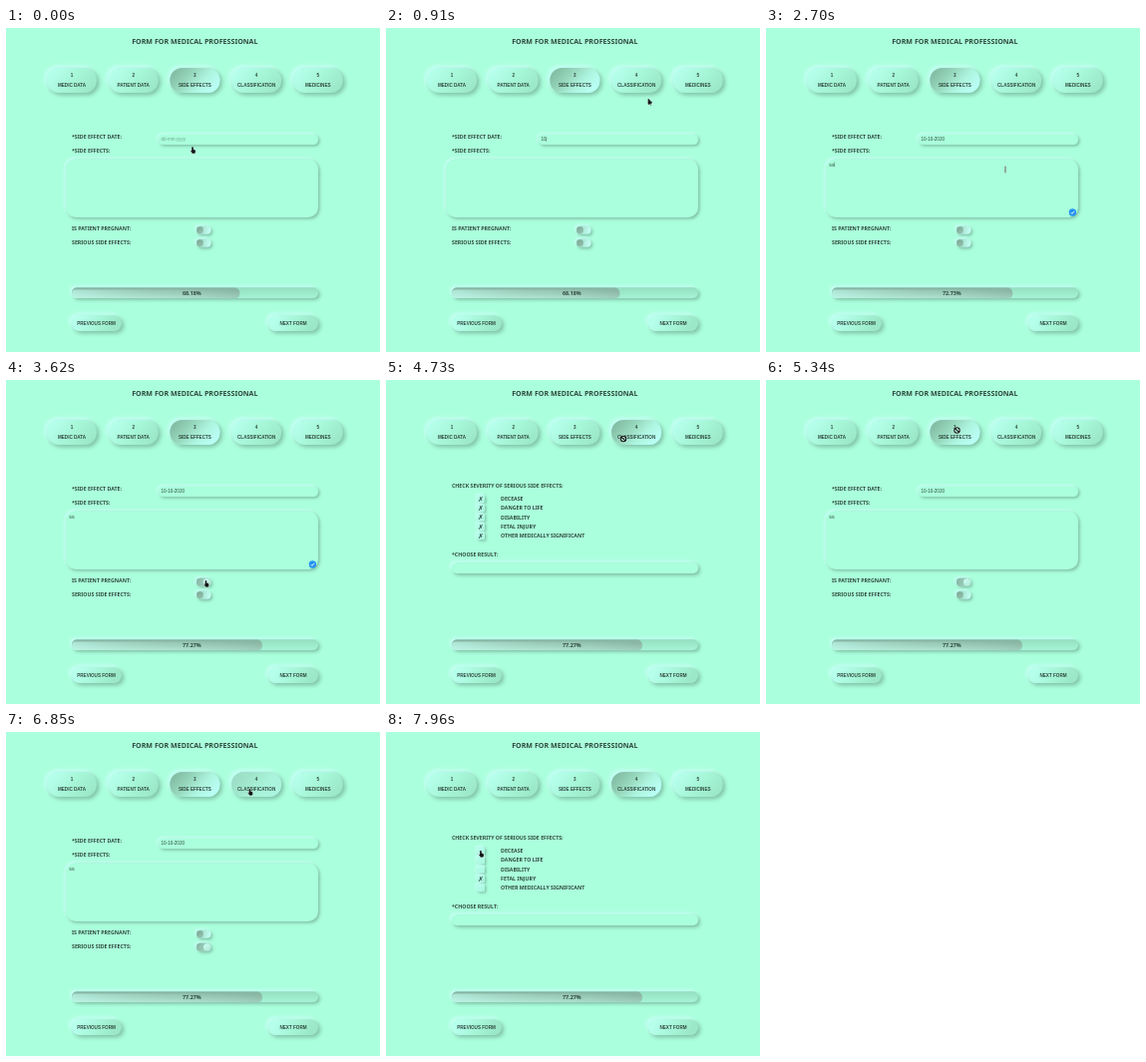
An HTML page with a canvas that plays this animation: 375x325 px, repeating every 8000 ms.

```html
<!DOCTYPE html>
<html lang="en">
<head>
<meta charset="utf-8">
<title>Medical form</title>
<style>
html, body { margin: 0; width: 100%; height: 100%; overflow: hidden; background: #aaffdc; }
canvas { display: block; width: 375px; height: 325px; }
</style>
</head>
<body>
<canvas id="stage"></canvas>
<script>
const LOOP = 8000, BASE = '#aaffdc', INK = '#30493f', BLACK = '#121816';
const LIGHT = '#c8fff8', DARK = '#7fc0a6';
const UI = '"Noto Sans", "Open Sans", sans-serif';
const SANS = '"Liberation Sans", Arial, sans-serif';
const TABS = ['MEDIC DATA', 'PATIENT DATA', 'SIDE EFFECTS', 'CLASSIFICATION', 'MEDICINES'];
const EFFECTS = ['DECEASE', 'DANGER TO LIFE', 'DISABILITY', 'FETAL INJURY', 'OTHER MEDICALLY SIGNIFICANT'];

// moments at which the user acts
const OPEN_CLASS = 4550, BACK = 5200, REOPEN = 6910;
const DATE_DONE = 1910, NOTE_FOCUS = 2400, SERIOUS_ON = 5800, PICK = 7700;

// arrival time and place of each pointer stop
const TRAVEL = 300;
const STOPS = [
  { at: 0, x: 187, y: 120.5 },
  { at: 250, x: 188, y: 111 },
  { at: 610, x: 263, y: 71.5 },
  { at: 2270, x: 240, y: 142 },
  { at: 3200, x: 200.5, y: 201.5 },
  { at: 4450, x: 238, y: 59 },
  { at: 5080, x: 191.5, y: 50.5 },
  { at: 5640, x: 200, y: 215 },
  { at: 6790, x: 244.5, y: 57.5 },
  { at: 7560, x: 108, y: 178 },
  { at: 7680, x: 96, y: 146 },
  { at: 7920, x: 95, y: 119.5 }
];

const canvas = document.getElementById('stage');
const ctx = canvas.getContext('2d');
const scale = window.devicePixelRatio || 1;
canvas.width = 375 * scale;
canvas.height = 325 * scale;

const clamp = (v, max = 1) => Math.max(0, Math.min(max, v));
const mix = (a, b, k) => a + (b - a) * k;
const ramp = (t, start, length = 120) => {
  const v = clamp((t - start) / length);
  return v * v * (3 - 2 * v);
};
const pageAt = t => t >= REOPEN || (t >= OPEN_CLASS && t < BACK) ? 4 : 3;
const tabX = i => 66 + i * 61.7;
const rowY = i => 119.2 + i * 9.3;

function pointerAt(t) {
  let { x, y } = STOPS[0];
  for (const stop of STOPS.slice(1)) {
    const k = ramp(t, stop.at - TRAVEL, TRAVEL);
    x = mix(x, stop.x, k);
    y = mix(y, stop.y, k);
  }
  return { x, y };
}

// the pointer's look follows from what lies under it
function pointerKind({ x, y }, page) {
  const within = (left, top, w, h) => x >= left && x <= left + w && y >= top && y <= top + h;
  const tab = TABS.findIndex((_, i) => within(tabX(i) - 25, 40, 50, 25));
  if (tab >= 0) return tab === page - 1 ? 'blocked' : 'hand';
  if (page === 4) return within(91, 115, 9, 46) ? 'hand' : 'arrow';
  if (within(153, 107, 160, 10) || within(60, 131, 253, 59)) return 'beam';
  return within(153, 118, 160, 10) || within(191, 199, 15, 22) ? 'hand' : 'arrow';
}

function text(str, x, y, font, align = 'left', color = INK) {
  ctx.font = font;
  ctx.textAlign = align;
  ctx.fillStyle = color;
  ctx.fillText(str, x, y);
}
const label = (str, x, y) => text(str, x, y + 1.7, `600 5.25px ${UI}`);
const small = (str, x, y) => text(str, x, y + 1.7, `bold 4.6px ${SANS}`, 'center');

function gradient(x0, y0, x1, y1, ...colors) {
  const g = ctx.createLinearGradient(x0, y0, x1, y1);
  colors.forEach((c, i) => g.addColorStop(i / (colors.length - 1), c));
  return g;
}

// light falls from the top left, so shading runs to the bottom right
function shade(x, y, w, h, ...colors) {
  const cx = x + w / 2, cy = y + h / 2;
  return gradient(cx - w * .3, cy - h * .55, cx + w * .3, cy + h * .55, ...colors);
}

function fillBox(x, y, w, h, r, fill) {
  ctx.beginPath();
  ctx.roundRect(x, y, w, h, r);
  ctx.fillStyle = fill;
  ctx.fill();
}

function raised(x, y, w, h, r, fill = BASE, depth = 1.8) {
  ctx.save();
  for (const side of [-1, 1]) {
    ctx.shadowColor = side < 0 ? LIGHT : DARK;
    ctx.shadowOffsetX = ctx.shadowOffsetY = side * depth * scale;
    ctx.shadowBlur = depth * 2 * scale;
    fillBox(x, y, w, h, r, fill);
  }
  ctx.restore();
}

function button(x, y, w, h, r, pressed = 0) {
  raised(x, y, w, h, r, shade(x, y, w, h, '#b5ffeb', '#a6f6d8', '#9be8c9'), 2.2);
  ctx.save();
  ctx.globalAlpha = pressed;
  fillBox(x, y, w, h, r, shade(x, y, w, h, '#84bea5', '#97d8bd', '#aef5e0', '#b9fff5'));
  ctx.restore();
}

function toggle(y, on) {
  const x = 191;
  raised(x, y, 14.5, 8, 4, gradient(x, y, x + 14, y + 4, '#93cdb7', '#c3fff3'), 1.6);
  ctx.save();
  ctx.globalAlpha = on;
  fillBox(x, y, 14.5, 8, 4, gradient(x, y, x + 14, y + 4, '#86b5a3', '#a5dcc7'));
  ctx.globalAlpha = 1 - on;
  fillBox(x + .3, y + .5, 6.5, 7, 3.3, shade(x, y, 7, 7, '#7da695', '#92c2ae'));
  ctx.globalAlpha = on;
  fillBox(x + 1 + on * 6, y + .5, 7, 7, 3.5, shade(x + 7, y, 7, 7, '#ccfff5', '#b2ebd9'));
  ctx.restore();
}

function header(t) {
  text('FORM FOR MEDICAL PROFESSIONAL', 189.3, 15.5, `bold 7.1px ${UI}`, 'center');
  const sideUp = ramp(t, OPEN_CLASS) - ramp(t, BACK - 50) + ramp(t, REOPEN);
  const classDown = ramp(t, OPEN_CLASS - 50) - ramp(t, BACK) + ramp(t, REOPEN - 120);
  TABS.forEach((name, i) => {
    const pressed = i === 2 ? 1 - sideUp : i === 3 ? classDown : 0;
    button(tabX(i) - 25, 40, 50, 25, 12, pressed);
    small(i + 1, tabX(i), 47);
    small(name, tabX(i), 57);
  });
}

function footer(t) {
  const filled = 15 + ramp(t, DATE_DONE - 260, 250) + ramp(t, NOTE_FOCUS + 240, 250);
  const x = 66, y = 260.5, w = 247 * filled / 22, h = 10.5;
  raised(x, y, 247, h, 5, gradient(x, y, x, y + h, '#95dfc1', '#a5f3d6'));
  fillBox(x, y, w, h, 5, gradient(x, y, x, y + h, '#83b09f', '#9bcbb8', '#b4e6d6'));
  fillBox(x, y + 2, w, h - 2, 4, gradient(x, 0, x + w, 0, '#c2fff199', '#a9e0cc44', '#7fa69766'));
  text((Math.round(filled) / 22 * 100).toFixed(2) + '%', 186.3, 267.6, `bold 5.4px ${UI}`, 'center');
  ['PREVIOUS FORM', 'NEXT FORM'].forEach((name, i) => {
    button(66 + i * 197, 288.5, 50, 15.5, 7.5);
    small(name, 90.5 + i * 197.5, 296);
  });
}

function typed(str, x, y, font, focused) {
  text(str, x, y, font);
  if (focused) ctx.fillRect(x + ctx.measureText(str).width, y - 4, .4, 4.8);
}

function badge(x, y) {
  fillBox(x - 3.7, y - 3.7, 7.4, 7.4, 3.7, '#2394ef');
  ctx.beginPath();
  ctx.moveTo(x - 1.7, y + .1);
  ctx.lineTo(x - .5, y + 1.3);
  ctx.lineTo(x + 1.8, y - 1.2);
  ctx.lineWidth = .9;
  ctx.strokeStyle = '#fff';
  ctx.stroke();
}

function sidePage(t) {
  label('*SIDE EFFECT DATE:', 66, 109.5);
  label('*SIDE EFFECTS:', 66, 123.5);
  raised(153, 107, 160, 10, 4.5, BASE, 1.5);
  const digits = clamp(Math.floor(10 + (t - DATE_DONE) / 135), 10);
  if (!digits) text('dd-mm-yyyy', 155.5, 113.1, `4.5px ${SANS}`, 'left', '#6ea48f');
  typed('10-10-2020'.slice(0, digits), 155.5, 113.2, `4.6px ${SANS}`, t > 270 && t < NOTE_FOCUS);

  raised(60, 131.5, 253, 58.5, 10, BASE, 1.6);
  const letters = clamp(Math.floor((t - NOTE_FOCUS) / 90), 2);
  typed('ss'.slice(0, letters), 63.3, 138.5, `5.2px ${SANS}`, t > NOTE_FOCUS && t < 3500);
  if (t > NOTE_FOCUS + 220 && t < OPEN_CLASS) badge(307.4, 185);

  label('IS PATIENT PREGNANT:', 66, 201.3);
  label('SERIOUS SIDE EFFECTS:', 66, 214.8);
  toggle(198.8, ramp(t, 3480, 160) - ramp(t, SERIOUS_ON, 200));
  toggle(211.8, ramp(t, SERIOUS_ON, 200));
}

function classPage(t) {
  label('CHECK SEVERITY OF SERIOUS SIDE EFFECTS:', 66, 106.2);
  EFFECTS.forEach((name, i) => {
    const y = rowY(i);
    raised(91.5, y - 4, 7.5, 7.8, 1.2, shade(91.5, y - 4, 7.5, 8, '#b8fff0', '#a6f6d8'), 1.4);
    const crossed = t < SERIOUS_ON || (i === 3 && t > PICK);
    if (crossed) text('✗', 95, y + 2.6, '7px "DejaVu Sans", sans-serif', 'center');
    label(name, 115, y);
  });
  label('*CHOOSE RESULT:', 66, 175.2);
  raised(66, 183.5, 247, 10.5, 5, BASE, 1.9);
}

const POINTER = {
  arrow() {
    ctx.moveTo(0, 0);
    ctx.lineTo(0, 5);
    ctx.lineTo(3.5, 3.6);
    ctx.closePath();
    ctx.moveTo(1.5, 3.5);
    ctx.lineTo(2.6, 5.9);
  },
  hand() {
    ctx.roundRect(-.5, 0, .9, 4, .4);
    ctx.roundRect(-.6, 2.6, 3.1, 3.2, .8);
    ctx.moveTo(-1.8, 3.5);
    ctx.lineTo(-.4, 5);
  },
  beam() {
    ctx.moveTo(0, -3);
    ctx.lineTo(0, 3);
  },
  blocked() {
    ctx.arc(0, 0, 2.7, 0, 7);
    ctx.moveTo(-1.9, -1.9);
    ctx.lineTo(1.9, 1.9);
  }
};

function pointer(spot, kind) {
  ctx.save();
  ctx.translate(spot.x, spot.y);
  ctx.lineJoin = ctx.lineCap = 'round';
  ctx.beginPath();
  POINTER[kind]();
  ctx.lineWidth = 1.7;
  ctx.strokeStyle = '#ffffff88';
  ctx.stroke();
  ctx.lineWidth = kind === 'blocked' ? 1.1 : .7;
  ctx.strokeStyle = ctx.fillStyle = BLACK;
  ctx.stroke();
  if (kind !== 'blocked') ctx.fill();
  ctx.restore();
}

function draw(t) {
  const page = pageAt(t), spot = pointerAt(t);
  ctx.setTransform(scale, 0, 0, scale, 0, 0);
  ctx.fillStyle = BASE;
  ctx.fillRect(0, 0, 375, 325);
  header(t);
  (page === 3 ? sidePage : classPage)(t);
  footer(t);
  pointer(spot, pointerKind(spot, page));
}

const begin = performance.now();
function tick() {
  draw((performance.now() - begin) % LOOP);
  requestAnimationFrame(tick);
}
tick();
</script>
</body>
</html>
```
